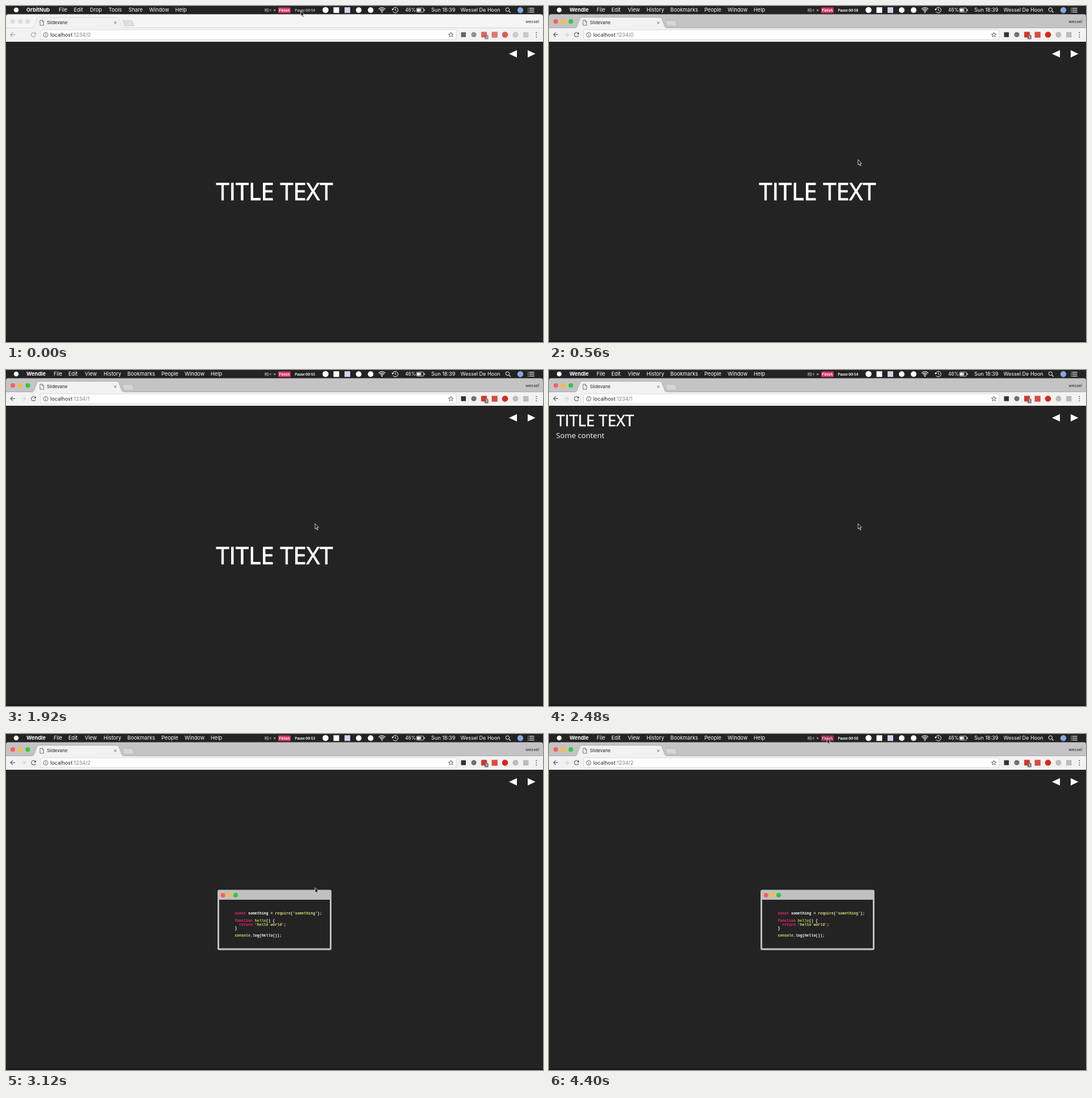
An HTML page with a canvas that plays this animation: 947x592 px, repeating every 4.64 s.

```html
<!DOCTYPE html>
<html lang="en">
<head>
<meta charset="utf-8">
<title>Slide deck demo</title>
<style>
html, body { margin: 0; width: 100%; height: 100%; overflow: hidden; background: #232323; }
canvas { display: block; }
</style>
</head>
<body>
<canvas id="stage" width="947" height="592"></canvas>
<script>
const ctx = document.getElementById('stage').getContext('2d');
const LOOP = 4640, STEP = 80, TICK = 480;
const DARK = '#232323', PALE = '#f2f2f2', UI = 'Inter, sans-serif';

// Cursor stops: time, x, y
const PATH = [
  [0, 520, 8.5], [80, 520, 8.5], [240, 545, 270.7],
  [3200, 545, 270.7], [3360, 520, 268],
  [3600, 520, 268], [3760, 519, 316], [4080, 490.5, 8], [LOOP, 490.5, 8]
];

const MENUS = {
  idle: ['OrbitNub', ['File', 93], ['Edit', 119.5], ['Drop', 148], ['Tools', 181],
    ['Share', 216], ['Window', 252.5], ['Help', 298.5]],
  active: ['Wendle', ['File', 84], ['Edit', 110], ['View', 139], ['History', 172],
    ['Bookmarks', 214], ['People', 274], ['Window', 315], ['Help', 361]]
};

const PINK = '#f92672', YELLOW = '#e6db74', GREEN = '#a6e22e', WHITE = '#fff';
// Row, then coloured runs
const CODE = [
  [0, PINK, 'const', WHITE, ' something = ', YELLOW, 'require', WHITE, '(', YELLOW, "'something'", WHITE, ');'],
  [2, PINK, 'function', GREEN, ' hello', WHITE, '() {'],
  [3, PINK, '  return', YELLOW, " 'hello world'", WHITE, ';'],
  [4, WHITE, '}'],
  [6, YELLOW, 'console', WHITE, '.log(hello());']
];

function text(str, x, y, size, color, weight = 400, align = 'left', family = UI) {
  ctx.font = `${weight} ${size}px ${family}`;
  ctx.textAlign = align;
  ctx.fillStyle = color;
  ctx.fillText(str, x, y);
}

function rect(x, y, w, h, color, r = 0) {
  ctx.fillStyle = color;
  ctx.beginPath();
  ctx.roundRect(x, y, w, h, r);
  ctx.fill();
}

function disc(x, y, r, color) {
  ctx.fillStyle = color;
  ctx.beginPath();
  ctx.arc(x, y, r, 0, Math.PI * 2);
  ctx.fill();
}

function trace(points, closed) {
  ctx.beginPath();
  for (let i = 0; i < points.length; i += 2) ctx.lineTo(points[i], points[i + 1]);
  if (closed) ctx.closePath();
}

function poly(points, color) {
  trace(points, true);
  ctx.fillStyle = color;
  ctx.fill();
}

function stroke(color, width) {
  ctx.strokeStyle = color;
  ctx.lineWidth = width;
  ctx.stroke();
}

function line(points, color, width = 1, closed = false) {
  trace(points, closed);
  stroke(color, width);
}

function arc(x, y, r, from, to, color, width = 1) {
  ctx.beginPath();
  ctx.arc(x, y, r, from, to);
  stroke(color, width);
}

function cross(x, y, r, color, width) {
  line([x - r, y - r, x + r, y + r], color, width);
  line([x - r, y + r, x + r, y - r], color, width);
}

function lights(x, y, gap, r, colors) {
  colors.forEach((color, i) => disc(x + i * gap, y, r, color));
}

function menuBar(t, active) {
  rect(0, 0, 947, 14.5, DARK);
  disc(18, 7, 4.3, WHITE);
  const [app, ...items] = active ? MENUS.active : MENUS.idle;
  text(app, 36, 10.4, 9.2, WHITE, 700);
  for (const [label, x] of items) text(label, x, 10.4, 9.2, WHITE);

  // Recorder controls
  const overPause = t < 160, overFinish = t >= 4080;
  rect(456, 4.5, 7.5, 6, '#777', 1);
  poly([464, 7, 467.5, 4.7, 467.5, 10.3], '#777');
  line([456, 11, 467, 4], DARK, 0.8);
  cross(473.7, 7.4, 1.6, '#ddd', 1);
  rect(480, 2.5, 22, 10, overFinish ? '#a32f55' : '#d3315f', 1);
  text('Finish', 491, 9.8, 6.4, overFinish ? '#dcc3cb' : WHITE, 700, 'center');
  const left = 59 - Math.floor(t / TICK);
  text('Pause 00:' + left, 509.5, 9.6, 5.8, overPause ? '#b5b5b5' : WHITE, 700);

  // Status items
  disc(563.5, 7, 5.3, WHITE);
  rect(577.5, 2.2, 10, 10, WHITE);
  rect(597, 2.2, 10, 10, '#d9d0f2');
  disc(622, 7.2, 5, WHITE);
  disc(643, 7.2, 5, WHITE);
  for (const r of [3, 5.7, 8.4]) arc(663, 11.3, r, -2.36, -0.78, WHITE, 1.3);
  disc(663, 11, 1.1, WHITE);
  arc(686.5, 7.2, 4.8, -2.7, 2.6, WHITE, 1);
  line([686.5, 4, 686.5, 7.5, 688.8, 8.7], WHITE, 0.9);
  poly([680, 5, 684, 5, 682, 8], WHITE);
  text('46%', 704, 10.3, 8.3, WHITE);
  ctx.beginPath();
  ctx.roundRect(724, 3.7, 12.5, 7, 1);
  stroke(WHITE, 0.8);
  rect(737.3, 5.8, 1.2, 2.8, WHITE);
  rect(725, 4.8, 4.3, 4.8, WHITE);
  poly([731.5, 3.3, 728.2, 7.7, 730.3, 7.7, 729.5, 11, 733.2, 6.5, 731, 6.5], WHITE);
  text('Sun 18:39', 750, 10.4, 9.1, WHITE);
  text('Wessel De Hoon', 801.5, 10.4, 9, WHITE);
  arc(884.3, 6.3, 3.2, 0, 7, WHITE, 1);
  line([886.6, 8.6, 889.7, 11.7], WHITE, 1.2);
  disc(907, 7.2, 5.2, '#7fa9df');
  for (const y of [3.4, 6.7, 10]) {
    rect(920, y, 1.4, 1.2, WHITE);
    rect(922.6, y, 9, 1.2, WHITE);
  }
}

function tabStrip(active) {
  rect(0, 14.5, 947, 30, active ? '#c4c3c5' : '#f5f5f5', [4, 4, 0, 0]);
  const edge = active ? '#aaa9ab' : '#d4d4d4';
  line([0, 38.5, 947, 38.5], edge, 1);
  lights(12, 27.3, 13.2, 4.1, active ? ['#fc605b', '#fdbc40', '#34c84a'] : Array(3).fill('#dddddd'));

  const tab = [46, 39, 49, 37, 55, 21.5, 57.5, 20, 196, 20, 198.5, 21.5, 204.5, 37, 207, 39];
  poly(tab, PALE);
  line(tab, edge, 0.8);
  const plus = [205.5, 25.3, 221, 25.3, 223, 26.5, 226, 35.3, 210, 35.3, 208, 34];
  poly(plus, active ? '#d6d5d7' : '#dedede');
  line(plus, active ? '#b3b2b4' : '#d0d0d0', 0.7, true);

  line([60, 25, 64, 25, 66.5, 27.6, 66.5, 34, 60, 34], '#555', 0.8, true);
  line([63.8, 25, 63.8, 27.8, 66.5, 27.8], '#555', 0.7);
  text('Slidevane', 72, 32.3, 7.9, '#222');
  cross(192.7, 29.5, 2, '#555', 0.9);
  text('wessel', 940, 30.3, 7.3, '#222', 400, 'right');
}

function arrow(x, dir, color) {
  line([x - 4 * dir, 50.5, x + 4 * dir, 50.5], color, 1.1);
  line([x, 46.6, x + 4 * dir, 50.5, x, 54.4], color, 1.1);
}

function star(x, y) {
  const points = [];
  for (let i = 0; i < 10; i++) {
    const r = i % 2 ? 1.9 : 4.6, a = i * Math.PI / 5 - Math.PI / 2;
    points.push(x + r * Math.cos(a), y + r * Math.sin(a));
  }
  line(points, '#555', 0.9, true);
}

function toolbar(page, active) {
  rect(0, 39, 947, 24.3, PALE);
  const ink = active ? '#555' : '#a0a0a0';
  arrow(12, -1, ink);
  if (active) arrow(30.5, 1, '#cfcfcf');
  arc(48.5, 50.5, 3.8, 0.4, 5.5, ink, 1.1);
  poly([52.8, 46.3, 52.8, 50, 49.2, 50], ink);

  ctx.beginPath();
  ctx.roundRect(61, 42, 733, 17.5, 2);
  ctx.fillStyle = WHITE;
  ctx.fill();
  stroke('#cfcfcf', 0.8);
  arc(70, 50.8, 4, 0, 7, '#555', 0.9);
  rect(69.5, 50, 1, 3, '#555');
  rect(69.5, 48.2, 1, 1, '#555');
  text('localhost', 78, 54, 9.1, '#222');
  const hostEnd = 78 + ctx.measureText('localhost').width;
  text(':1234/' + page, hostEnd, 54, 9.1, '#808080');
  star(784.5, 50.8);

  // Extension badges
  ctx.globalAlpha = active ? 1 : 0.75;
  rect(802.5, 46.3, 8.5, 8.5, '#333');
  disc(825, 50.5, 4.6, '#707070');
  rect(838, 45.5, 10, 10, '#d9342b', 1);
  rect(844, 51, 6.6, 7.6, '#666', 1);
  text('3', 847.3, 57.2, 6.2, WHITE, 600, 'center');
  rect(856.5, 45.5, 10.3, 10.3, '#dc4a3d');
  disc(880, 50.6, 5.3, '#d8281f');
  disc(898.5, 50.6, 5.1, '#bdbdbd');
  rect(912, 46, 9.5, 9.5, '#bcbcbc');
  ctx.globalAlpha = 1;
  for (const y of [46.8, 50.6, 54.4]) disc(935.3, y, 0.95, '#555');
}

function heading(x, y, size, align) {
  text('TITLE TEXT', x, y, size, WHITE, 400, align, '"Open Sans", sans-serif');
  ctx.strokeStyle = WHITE;
  ctx.lineWidth = size * 0.022;
  ctx.strokeText('TITLE TEXT', x, y);
}

function codeWindow() {
  rect(373, 274.5, 201, 106.3, '#c1c0c1', 3);
  rect(376, 292, 195, 85.5, DARK);
  lights(382.6, 284, 11.2, 4, ['#ff5f56', '#ffbd2e', '#27c93f']);
  for (const [row, ...runs] of CODE) {
    let x = 403.4;
    for (let i = 0; i < runs.length; i += 2) {
      text(runs[i + 1], x, 317.8 + row * 6.57, 6.57, runs[i], 700, 'left', '"Liberation Mono", monospace');
      x += ctx.measureText(runs[i + 1]).width;
    }
  }
}

function slide(index) {
  rect(0, 63, 947, 529, DARK);
  rect(0, 589.5, 947, 2.5, '#1b1719');
  poly([901, 77.7, 901, 90.7, 887, 84.2], WHITE);
  poly([920, 77.7, 920, 90.7, 933.5, 84.2], WHITE);
  if (index === 0) heading(473.5, 341.7, 41.5, 'center');
  if (index === 1) {
    heading(12.8, 99, 27.6, 'left');
    text('Some content', 12.6, 120.3, 13.14, WHITE, 400, 'left', '"Open Sans", sans-serif');
  }
  if (index === 2) codeWindow();
}

function cursor(t) {
  const i = PATH.findIndex(stop => stop[0] > t);
  const [t0, x0, y0] = PATH[i - 1], [t1, x1, y1] = PATH[i];
  const p = (t - t0) / (t1 - t0), k = p * p * (3 - 2 * p);
  ctx.save();
  ctx.translate(x0 + (x1 - x0) * k, y0 + (y1 - y0) * k);
  const shape = [0, 0, 0, 9.3, 2, 7.4, 3.6, 11, 5.1, 10.4, 3.5, 6.8, 6.3, 6.6];
  poly(shape, '#111');
  line(shape, WHITE, 0.8, true);
  ctx.restore();
}

function draw(now) {
  const t = Math.floor(now % LOOP / STEP) * STEP;
  const active = t >= 560;
  const page = t < 1520 ? 0 : t < 2960 ? 1 : 2;
  rect(0, 0, 947, 592, DARK);
  menuBar(t, active);
  tabStrip(active);
  toolbar(page, active);
  slide(t < 2000 ? 0 : t < 3040 ? 1 : 2);
  cursor(t);
}

const start = performance.now();
function loop() {
  draw(performance.now() - start);
  requestAnimationFrame(loop);
}
loop();
</script>
</body>
</html>
```
